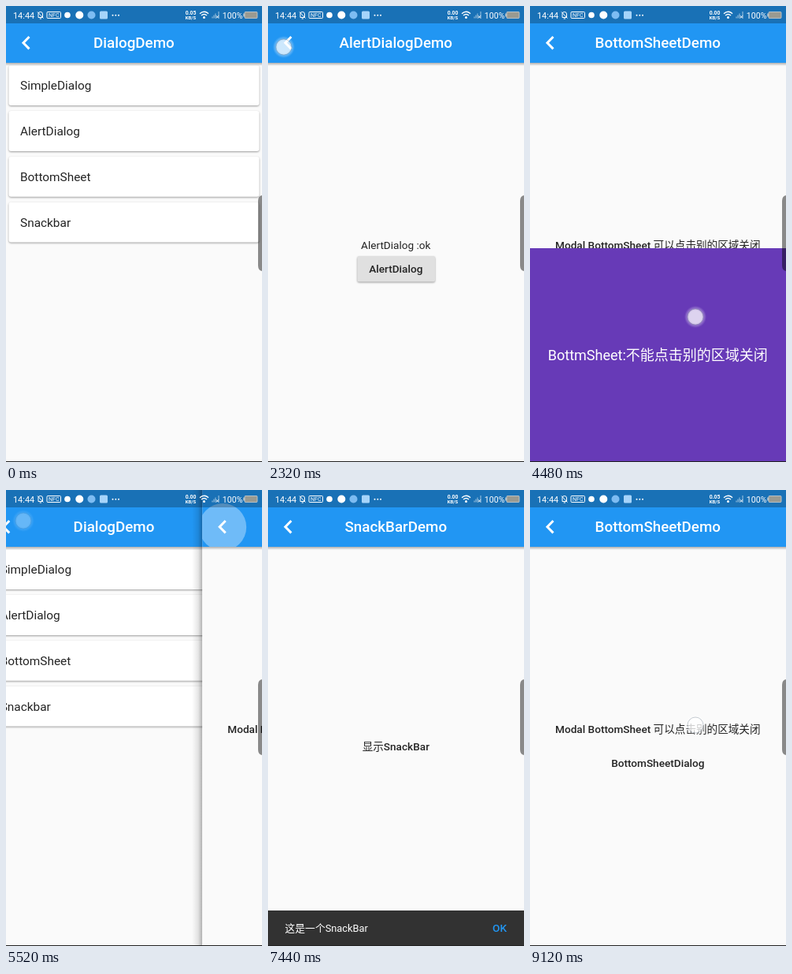
An HTML page that plays this animation: 325x578 px, repeating every 9.2 s.

```html
<!DOCTYPE html>
<html lang="zh-CN">
<head>
<meta charset="utf-8">
<title>Dialog demo</title>
<style>
  html, body { margin: 0; width: 100%; height: 100%; overflow: hidden; background: #fafafa; }
  svg { display: block; width: 100vw; height: 100vh; }
  text { font-family: Roboto, "Noto Sans CJK SC", "Noto Sans CJK", sans-serif; white-space: pre; }
  .lift { filter: drop-shadow(0 1.2px 1.3px rgba(0, 0, 0, .38)); }
  .dialog { filter: drop-shadow(0 9px 9px rgba(0, 0, 0, .32)); }
</style>
</head>
<body>
<svg id="stage" viewBox="0 0 325 578" preserveAspectRatio="none">
  <defs>
    <linearGradient id="edge"><stop offset="0" stop-opacity="0"/><stop offset=".6" stop-opacity=".1"/><stop offset="1" stop-opacity=".3"/></linearGradient>
    <linearGradient id="drop" x2="0" y2="1"><stop offset="0" stop-opacity=".3"/><stop offset="1" stop-opacity="0"/></linearGradient>
    <radialGradient id="glow"><stop offset=".55" stop-color="#fff" stop-opacity=".55"/><stop offset="1" stop-color="#fff" stop-opacity="0"/></radialGradient>
    <clipPath id="bar"><rect width="325" height="72"/></clipPath>
  </defs>
</svg>
<script>
const LOOP = 9200, STEP = 80, W = 325, H = 578, SHEET = 271, SNACK = 45, SLIDE = 320;
const INK = '#242424', BLUE = '#2196f3';
const stage = document.getElementById('stage');
const $ = id => document.getElementById(id);
const clamp = v => Math.max(0, Math.min(1, v));
const ramp = (t, from, length) => clamp((t - from) / length);
const easeOut = p => 1 - Math.pow(1 - p, 2.1);
const smooth = p => p * p * (3 - 2 * p);
const show = (id, on) => $(id).setAttribute('visibility', on ? 'inherit' : 'hidden');
const move = (id, x, y) => $(id).setAttribute('transform', `translate(${x} ${y})`);
const fade = (id, v) => $(id).setAttribute('opacity', v);

const rect = (x, y, w, h, fill, more = '') =>
  `<rect x="${x}" y="${y}" width="${w}" height="${h}" fill="${fill}" ${more}/>`;
const text = (x, y, size, str, { fill = INK, weight = 400, anchor = 'start', id = '' } = {}) =>
  `<text x="${x}" y="${y}" font-size="${size}" fill="${fill}" font-weight="${weight}" text-anchor="${anchor}"${id && ` id="${id}"`}>${str}</text>`;
const mid = (y, size, str, opts) => text(162.3, y, size, str, { anchor: 'middle', ...opts });
const light = str => `<tspan font-weight="400">${str}</tspan>`;

const page = (id, title, body) => `<g id="${id}">
  ${id === 'list' ? '' : rect(-13, 0, 13, H, 'url(#edge)')}
  ${rect(0, 0, W, H, '#fafafa')}${body}
  ${rect(0, 72, W, 4, 'url(#drop)')}${rect(0, 0, W, 72, BLUE)}
  ${id === 'list' ? '' : `<g clip-path="url(#bar)"><circle id="${id}Ripple" cx="26" cy="47" fill="#fff" opacity=".35"/></g>`}
  <path d="M29.5 39L22 46.7L29.5 54.4" fill="none" stroke="#fff" stroke-width="3"/>
  ${mid(53, 18.8, title, { fill: '#fff', weight: 500 })}</g>`;

const rows = ['SimpleDialog', 'AlertDialog', 'BottomSheet', 'Snackbar'].map((label, i) => {
  const y = 75.3 + i * 57.8;
  return rect(3.5, y, 318, 50.8, '#fff', 'rx="3" class="lift"') + text(18, y + 31, 15.4, label);
}).join('');

const alertBody = mid(307.7, 13.6, '', { id: 'result' }) +
  rect(113.5, 317, 98.5, 32.5, '#e0e0e0', 'rx="2" class="lift"') +
  mid(337.7, 13.6, 'AlertDialog', { weight: 500 });

const sheetBody = mid(308, 13.6, 'Modal BottomSheet ' + light('可以点击别的区域关闭'), { weight: 500 }) +
  mid(351, 13.6, 'BottomSheetDialog', { weight: 500 }) +
  `<g id="panel">${rect(0, 0, W, SHEET, '#673ab7')}
  ${mid(142, 18, 'BottmSheet:不能点击别的区域关闭', { fill: '#fff' })}</g>`;

const snackBody = mid(330, 13.6, light('显示') + 'SnackBar', { weight: 500 }) +
  `<g id="snackbar">${rect(0, 0, W, SNACK, '#323232')}<g id="snackText">
  ${text(21.5, 27, 12.8, '这是一个SnackBar', { fill: '#fff' })}
  ${text(285, 27.2, 13.6, 'OK', { fill: BLUE, weight: 500 })}</g></g>`;

const dialog = `<g id="dialog">${rect(0, 0, W, H, '#000', 'opacity=".54"')}
  ${rect(36, 214.5, 253, 170, '#fff', 'rx="2" class="dialog"')}
  ${text(58, 258, 18.8, '标题')}${text(58, 300.5, 15, '内容')}
  ${text(174, 360.5, 13.6, '取消', { fill: '#8b979f' })}${text(239.5, 360.5, 13.6, '确定', { fill: '#3f8fce' })}</g>`;

const white = { fill: '#fff' }, tiny = { fill: '#fff', weight: 700, anchor: 'middle' };
const status = `<g>
  ${text(9, 15.7, 10.9, '14:44', white)}
  <path d="M41 14.5V9.5Q41 7.5 43.8 7.5Q46.5 7.5 46.5 10V14.5ZM40 7.5L47.5 15.5M42.7 16H45" fill="none" stroke="#fff"/>
  ${rect(52, 7.5, 17.5, 8, 'none', 'stroke="#fff" rx="1"')}${text(60.8, 14.2, 7, 'NFC', { ...white, anchor: 'middle' })}
  <circle cx="78" cy="11.5" r="3.8" fill="#fff"/><circle cx="93.3" cy="11.5" r="5" fill="#fff"/>
  <circle cx="108.5" cy="11.5" r="5" fill="#7dbcf2"/>${rect(119, 6.5, 10, 10, '#a6d4fa', 'rx="1.5"')}
  ${[135.5, 139.3, 143].map(x => `<circle cx="${x}" cy="11.7" r="1" fill="#fff"/>`).join('')}
  ${text(234.5, 10.8, 6.8, '', { ...tiny, id: 'speed' })}${text(234.5, 17, 6, 'KB/S', tiny)}
  <path d="M246 9.7Q251.5 5 257 9.7M248 12Q251.5 9 255 12" fill="none" stroke="#fff" stroke-width="1.4"/><circle cx="251.5" cy="14.4" r="1.5" fill="#fff"/>
  <path d="M262 15.5V13.5M264 15.5V11.5M266 15.5V9.5M270 15.5V7" stroke="#fff" stroke-opacity=".55" stroke-width="1.1"/>
  <path d="M266.8 12.2L270 15.5M270 12.2L266.8 15.5" stroke="#fff"/>
  ${text(274.8, 15.7, 10.6, '100%', white)}
  ${rect(303, 7.5, 16, 8, '#9a9a91', 'stroke="#c9d0d2" stroke-width=".8" rx="1"')}${rect(301.3, 9.5, 1.5, 4, '#c9d0d2')}</g>`;

stage.insertAdjacentHTML('beforeend',
  page('list', 'DialogDemo', rows) +
  page('alert', 'AlertDialogDemo', alertBody) +
  page('sheet', 'BottomSheetDemo', sheetBody) +
  page('snack', 'SnackBarDemo', snackBody) +
  rect(0, 0, W, 22, '#000', 'opacity=".25"') + dialog + status +
  `<path d="M325 240Q320 241 320 247V329Q320 335 325 336Z" fill="#000" opacity=".45"/>` +
  rect(0, 577, W, 1, '#222') +
  `<g id="touch"><circle r="14" fill="url(#glow)"/><circle r="10" fill="#fff" fill-opacity=".5" stroke="#607080" stroke-opacity=".35"/></g>`);

// page, push time, pop time
const visits = [['alert', 240, 2320], ['sheet', 2800, 5360], ['snack', 5920, 7680], ['sheet', 8240, LOOP * 2]];
// time, x, y, time held
const taps = [
  [160, 200, 159, 0], [1040, 165, 333, 0], [1680, 245, 351, 0], [2320, 20, 52, 0],
  [2800, 205, 217, 0], [3600, 205, 346, 0], [4160, 210, 394, 640], [5360, 22, 39, 0],
  [5920, 205, 274, 0], [6480, 165, 325, 0], [7040, 294, 555, 160], [7600, 22, 45, 0],
  [8160, 205, 217, 0], [9040, 210, 298, 160]
];

function draw(t) {
  let shift = 0;
  for (const id of ['alert', 'sheet', 'snack']) show(id, false);
  for (const [id, push, pop] of visits) {
    if (t < push || t > pop + SLIDE) continue;
    const cover = easeOut(ramp(t, push, SLIDE)) - easeOut(ramp(t, pop, SLIDE));
    show(id, cover > 0);
    move(id, W * (1 - cover), 0);
    $(id + 'Ripple').setAttribute('r', t > pop ? 10 + 20 * ramp(t, pop, 160) : 0);
    shift = -cover * W / 3;
  }
  move('list', shift, 0);

  const drag = SHEET * smooth(ramp(t, 4480, 560));
  const open = easeOut(ramp(t, 3600, 240)) * SHEET - drag;
  show('panel', open > 0 && t < 5040);
  move('panel', 0, H - open);

  const snack = ramp(t, 6560, 320);
  show('snackbar', snack > 0);
  move('snackbar', 0, H - SNACK * easeOut(snack));
  fade('snackText', ramp(snack, .4, .6));

  fade('dialog', ramp(t, 1000, 200) - ramp(t, 1680, 160));
  $('result').textContent = 'AlertDialog :' + (t >= 1760 ? 'ok' : '');
  $('speed').textContent = t < 1040 || t >= 8720 ? '0.05' : '0.00';

  const tap = taps.filter(([at]) => t >= at).pop();
  const [at, x, y, hold] = tap || [-LOOP, 0, 0, 0];
  const age = Math.max(0, t - at - hold) / 240;
  fade('touch', clamp(1 - age * .9) * (age < 1 ? 1 : 0));
  move('touch', x, y + (at === 4160 ? drag * .65 : 0));
}

const start = performance.now();
function tick() {
  const t = (performance.now() - start) % LOOP;
  draw(Math.floor(t / STEP) * STEP);
  requestAnimationFrame(tick);
}
draw(0);
tick();
</script>
</body>
</html>
```
